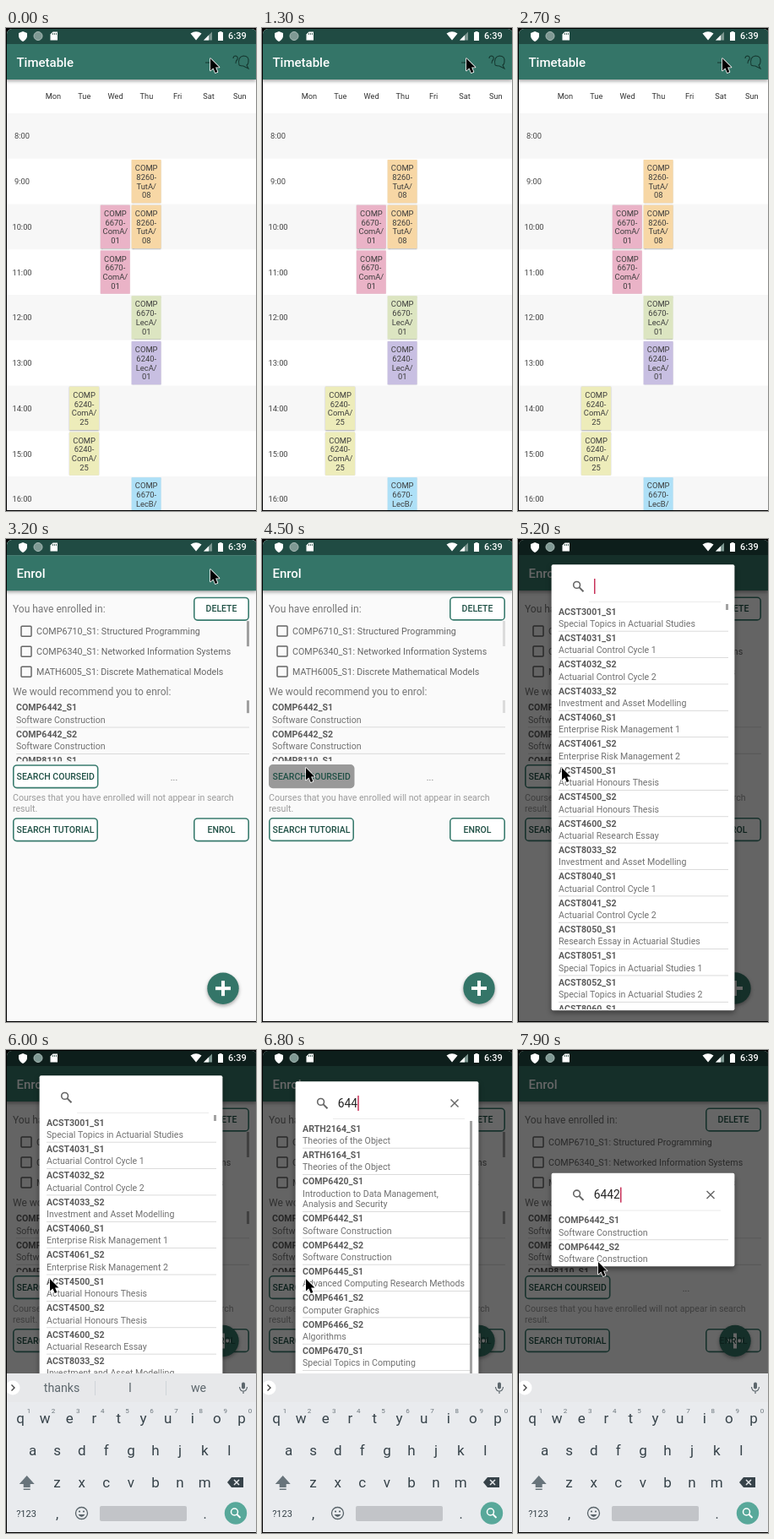
These frames come from a looping animation (296 by 572 pixels, 8000 ms). An HTML page with a canvas:

```html
<!DOCTYPE html>
<html lang="en">
<head>
<meta charset="utf-8">
<title>Timetable</title>
<style>
html, body { margin: 0; width: 100%; height: 100%; overflow: hidden; background: #000; }
canvas { display: block; width: 296px; height: 572px; }
</style>
</head>
<body>
<canvas id="stage"></canvas>
<script>
const W = 296, H = 572, LOOP = 8000, TICK = 100;
const BAR = '#347568', STATUS = '#204b43', INK = '#1f5045';
const canvas = document.getElementById('stage');
const c = canvas.getContext('2d');
const dpr = window.devicePixelRatio || 1;
canvas.width = W * dpr;
canvas.height = H * dpr;

const ramp = (t, a, b) => Math.min(1, Math.max(0, (t - a) / (b - a)));
const ease = k => k * k * (3 - 2 * k);
const easeOut = k => 1 - (1 - k) ** 4;
const mix = (a, b, k) => a + (b - a) * k;

// y is the middle of the capital letters
function text(s, x, y, size, color, weight = 400, align = 'left') {
  c.font = `${weight} ${size}px Roboto, sans-serif`;
  c.textAlign = align;
  c.fillStyle = color;
  c.fillText(s, x, y + size * 0.355);
}
function rect(x, y, w, h, color) {
  c.fillStyle = color;
  c.fillRect(x, y, w, h);
}
function round(x, y, w, h, r) {
  c.beginPath();
  c.roundRect(x, y, w, h, r);
}
function disc(x, y, r, color) {
  c.fillStyle = color;
  c.beginPath();
  c.arc(x, y, r, 0, 7);
  c.fill();
}
function ring(x, y, r, color, width) {
  c.beginPath();
  c.arc(x, y, r, 0, 7);
  c.strokeStyle = color;
  c.lineWidth = width;
  c.stroke();
}
function poly(points, color) {
  c.beginPath();
  points.forEach(([x, y]) => c.lineTo(x, y));
  c.closePath();
  c.fillStyle = color;
  c.fill();
}
function line(points, color, width) {
  c.beginPath();
  points.forEach(([x, y]) => c.lineTo(x, y));
  c.strokeStyle = color;
  c.lineWidth = width;
  c.stroke();
}
function path(d, color, width) {
  const p = new Path2D(d);
  if (width) {
    c.strokeStyle = color;
    c.lineWidth = width;
    c.stroke(p);
  } else {
    c.fillStyle = color;
    c.fill(p);
  }
}
function group(draw) {
  c.save();
  draw();
  c.restore();
}
function clipTo(x, y, w, h) {
  c.beginPath();
  c.rect(x, y, w, h);
  c.clip();
}
function shadow(color, blur, dy) {
  c.shadowColor = color;
  c.shadowBlur = blur * dpr;
  c.shadowOffsetY = dy * dpr;
}

// ---- status bar and toolbar ----
function statusIcons() {
  path('M20 4 L25 6 V10 Q24 14 20 16 Q16 14 15 10 V6 Z', '#fff');
  disc(38, 9.5, 5, '#7f9994');
  ring(38, 9.5, 5, '#a9bbb7', 1);
  path('M55.5 4.5 H61 V14.5 H52.5 V7.5 Z', '#fff');
  [55, 57, 59].forEach(x => rect(x, 6, 1, 2, '#49675f'));
  path('M218.5 6.5 Q225 2 231.5 6.5 L225 14.5 Z', '#fff');
  poly([[234, 14.5], [244, 14.5], [244, 4.5]], '#7b958f');
  poly([[234, 14.5], [240, 14.5], [240, 8.5]], '#fff');
  rect(251, 5, 6, 10, '#fff');
  rect(252.5, 4, 3, 1, '#fff');
  text('6:39', 263, 9.5, 11, '#fff', 500);
}
function toolbar(title) {
  group(() => {
    shadow('rgba(0,0,0,.35)', 4, 1.5);
    rect(0, 19, W, 42, BAR);
  });
  rect(0, 0, W, 19, STATUS);
  text(title, 12.5, 40.5, 15, '#fff', 500);
}

// ---- timetable ----
const ROW = 53.75, COL = 36.8, TOP = 101;
const DAYS = ['Mon', 'Tue', 'Wed', 'Thu', 'Fri', 'Sat', 'Sun'];
const CELLS = [
  [3, 9, '8260-', 'TutA/', '08', '#f7d7a5'],
  [3, 10, '8260-', 'TutA/', '08', '#f7d7a5'],
  [2, 10, '6670-', 'ComA/', '01', '#eab3c7'],
  [2, 11, '6670-', 'ComA/', '01', '#eab3c7'],
  [3, 12, '6670-', 'LecA/', '01', '#dce5c1'],
  [3, 13, '6240-', 'LecA/', '01', '#c8bfe2'],
  [1, 14, '6240-', 'ComA/', '25', '#edecba'],
  [1, 15, '6240-', 'ComA/', '25', '#edecba'],
  [3, 16, '6670-', 'LecB/', '01', '#aee0f7']
];
function timetable() {
  rect(0, 0, W, H, '#fff');
  for (let h = 8; h <= 16; h++) {
    const y = TOP + (h - 8) * ROW;
    if (h % 2 === 0) rect(0, y, W, ROW, '#f7f7f7');
    text(h + ':00', 19, y + 27, 9.3, '#444', 400, 'center');
  }
  for (const [day, hour, ...rest] of CELLS) {
    const color = rest.pop(), x = 75 + (day - 1) * COL, y = TOP + (hour - 8) * ROW + 1.2;
    group(() => {
      shadow('rgba(0,0,0,.3)', 1.5, 0.7);
      rect(x, y, 35, 51.3, color);
    });
    ['COMP', ...rest].forEach((s, i) =>
      text(s, x + 17.6, y + 9.8 + i * 10.8, 9.4, '#3c3c3c', 400, 'center'));
  }
  DAYS.forEach((d, i) => text(d, 56 + i * COL, 81, 9.2, '#333', 400, 'center'));
  toolbar('Timetable');
  line([[236, 41], [248, 41]], '#15372f', 1.2);
  line([[242, 35], [242, 47]], '#15372f', 1.2);
  path('M276 44 Q274 34 281 33 Q288 33 287 40 Q287 43 285 44 L287 48 L281 45 Q278 45 276 44', '#15372f', 1.1);
  path('M269 36 Q269 33 272 33 Q275 34 274 37 Q272 39 272 42', '#15372f', 1.1);
  statusIcons();
}

// ---- enrol page ----
const SOFT = 'Software Construction';
function button(s, x, y, w, pressed) {
  round(x + 0.8, y + 0.8, w - 1.6, 26.6, 4);
  c.fillStyle = pressed ? '#999' : '#fff';
  c.fill();
  c.strokeStyle = pressed ? '#999' : '#3a7c6f';
  c.lineWidth = 1.6;
  c.stroke();
  text(s, x + w / 2, y + 14, 10.5, INK, 500, 'center');
}
// Entries read "code|line|line"; y is the middle of the first code
function courseList(items, x, right, y) {
  for (const item of items) {
    const [code, ...lines] = item.split('|');
    text(code, x, y, 10.6, '#5c5c5c', 700);
    lines.forEach((s, i) => text(s, x, y + 14.4 + i * 12.5, 10.6, '#707070'));
    y += 31.37 + (lines.length - 1) * 12.5;
    rect(x, y - 8.4, right - x, 0.8, '#d2d2d2');
  }
}
function enrol(pressed, bars, fabY) {
  rect(0, 0, W, H, '#fafafa');
  text('You have enrolled in:', 8, 82.5, 12, '#757575');
  button('DELETE', 222, 68.5, 66);
  ['COMP6710_S1: Structured Programming',
   'COMP6340_S1: Networked Information Systems',
   'MATH6005_S1: Discrete Mathematical Models'].forEach((s, i) => {
    const y = 109 + i * 24;
    round(18, y - 6, 12, 12, 1);
    c.strokeStyle = '#666';
    c.lineWidth = 1.5;
    c.stroke();
    text(s, 36, y, 10.7, '#666');
  });
  text('We would recommend you to enrol:', 8, 180.5, 12, '#757575');
  group(() => {
    clipTo(0, 190, W, 73);
    courseList(['COMP6442_S1|' + SOFT, 'COMP6442_S2|' + SOFT, 'COMP8110_S1|'], 12, 288, 199.5);
  });
  group(() => {
    c.globalAlpha *= bars;
    rect(285, 97, 3, 30, '#a0a0a0');
    rect(285, 191, 3, 15, '#a0a0a0');
  });
  button('SEARCH COURSEID', 8, 267, 101.5, pressed);
  text('...', 199, 282, 10.6, '#777', 400, 'center');
  text('Courses that you have enrolled will not appear in search', 8, 306.5, 10.6, '#9a9a9a');
  text('result.', 8, 319, 10.6, '#9a9a9a');
  button('SEARCH TUTORIAL', 8, 330, 101, false);
  button('ENROL', 222, 330, 66, false);
  group(() => {
    shadow('rgba(0,0,0,.35)', 4, 2);
    disc(257, fabY, 18.7, BAR);
  });
  rect(248, fabY - 2, 18, 4, '#fff');
  rect(255, fabY - 9, 4, 18, '#fff');
  if (fabY < 400) text('ENROL', 255, 344, 10.5, INK, 500, 'center');
  toolbar('Enrol');
}

// ---- search dialog ----
const ALL = [
  'ACST3001_S1|Special Topics in Actuarial Studies',
  'ACST4031_S1|Actuarial Control Cycle 1',
  'ACST4032_S2|Actuarial Control Cycle 2',
  'ACST4033_S2|Investment and Asset Modelling',
  'ACST4060_S1|Enterprise Risk Management 1',
  'ACST4061_S2|Enterprise Risk Management 2',
  'ACST4500_S1|Actuarial Honours Thesis',
  'ACST4500_S2|Actuarial Honours Thesis',
  'ACST4600_S2|Actuarial Research Essay',
  'ACST8033_S2|Investment and Asset Modelling',
  'ACST8040_S1|Actuarial Control Cycle 1',
  'ACST8041_S2|Actuarial Control Cycle 2',
  'ACST8050_S1|Research Essay in Actuarial Studies',
  'ACST8051_S1|Special Topics in Actuarial Studies 1',
  'ACST8052_S1|Special Topics in Actuarial Studies 2',
  'ACST8060_S1|'
];
const FOUND = [
  'ARTH2164_S1|Theories of the Object',
  'ARTH6164_S1|Theories of the Object',
  'COMP6420_S1|Introduction to Data Management,|Analysis and Security',
  'COMP6442_S1|' + SOFT,
  'COMP6442_S2|' + SOFT,
  'COMP6445_S1|Advanced Computing Research Methods',
  'COMP6461_S2|Computer Graphics',
  'COMP6466_S2|Algorithms',
  'COMP6470_S1|Special Topics in Computing'
];
const QUERY = '6442', KEY_TIMES = [6300, 6500, 6700, 6900], LAG = 150;
const keysBy = t => KEY_TIMES.filter(k => k <= t).length;

// The list follows the query a moment later
function results(t) {
  const n = keysBy(t - LAG);
  if (n < 2) return { items: ALL, top: 30.5, bottom: 558 };
  if (n < 3) return { items: FOUND, top: 37.5, bottom: 558 };
  const items = FOUND.slice(3, n < 4 ? 6 : 5);
  const half = (47 + 31.4 * items.length) / 2;
  return { items, top: 201 - half, bottom: 201 + half };
}
function dialog(t) {
  const { items, top, bottom } = results(t), h = bottom - top, mid = top + 25.5;
  group(() => {
    shadow('rgba(0,0,0,.4)', 6, 3);
    round(39.6, top - 0.3, 216.8, h + 0.6, 2);
    c.fillStyle = '#fff';
    c.fill();
  });
  ring(69.6, mid - 1.6, 3.9, '#666', 1.6);
  line([[72.6, mid + 1.4], [77.5, mid + 6.3]], '#666', 2);
  rect(84, top + 43.6, 156, 0.7, '#e2e2e2');
  const n = keysBy(t), s = QUERY.slice(0, n);
  text(s, 89.8, mid, 13.8, '#222');
  const caretX = 90 + c.measureText(s).width;
  if (n) {
    line([[223.5, mid - 4.5], [232.5, mid + 4.5]], '#666', 1.4);
    line([[232.5, mid - 4.5], [223.5, mid + 4.5]], '#666', 1.4);
  }
  const since = t - (n ? KEY_TIMES[n - 1] : 5100);
  if (Math.floor(since / 500) % 2 === 0) rect(caretX, mid - 9, 1.5, 18, '#c8325a');
  group(() => {
    clipTo(40, top + 45, 216, h - 46);
    courseList(items, 48, 249, top + 55.3);
    if (items === ALL) rect(246, 77, 3, 7, '#a2a2a2');
    if (items === FOUND) rect(246, 84, 3, 400, '#a2a2a2');
  });
}

// ---- keyboard ----
const KEY = '#37434a', BOARD = '#e9ebee';
function keyboard(y, suggest) {
  group(() => {
    c.translate(0, y - 383);
    rect(0, 383, W, 190, BOARD);
    rect(0, 383, W, 34, '#e7e8ea');
    disc(8, 400, 8.5, '#fff');
    line([[6.5, 396.5], [10, 400], [6.5, 403.5]], '#444', 1.4);
    if (suggest) {
      [['thanks', 66], ['I', 147], ['we', 228]].forEach(([s, x]) =>
        text(s, x, 400, 14.2, '#5d676d', 400, 'center'));
      [105, 189].forEach(x => rect(x, 392, 1, 17, '#cfd4d8'));
    }
    round(279, 393.5, 4, 8, 2);
    c.fillStyle = '#5d676d';
    c.fill();
    path('M276.5 399 Q277 404 281 404 Q285 404 285.5 399 M281 404 V407', '#5d676d', 1.2);

    [['qwertyuiop', 17, 436], ['asdfghjkl', 31.5, 473.5], ['zxcvbnm', 60.5, 511.5]].forEach(([keys, x0, ky], row) =>
      [...keys].forEach((k, i) => {
        const x = x0 + i * 29.1;
        text(k, x, ky, 17, KEY, 400, 'center');
        if (row === 0) text((i + 1) % 10, x + 10, 427.5, 8, '#6c767c', 400, 'center');
      }));
    poly([[24.7, 504], [33.7, 514], [28.7, 514], [28.7, 518], [20.7, 518], [20.7, 514], [15.7, 514]], '#68747b');
    rect(20.7, 519.5, 8, 1.5, '#68747b');
    poly([[262, 512], [267, 506], [281, 506], [281, 518], [267, 518]], KEY);
    line([[270, 509], [276, 515]], BOARD, 1.4);
    line([[276, 509], [270, 515]], BOARD, 1.4);

    text('?123', 24, 549, 11, KEY, 400, 'center');
    text(',', 60.5, 549, 16, KEY, 400, 'center');
    text('.', 235.5, 549, 16, KEY, 400, 'center');
    ring(89.5, 548.5, 7, '#59646a', 1.3);
    disc(87, 546.5, 1.1, '#59646a');
    disc(92, 546.5, 1.1, '#59646a');
    path('M85.5 550 Q89.5 556 93.5 550 Z', '#59646a');
    round(111, 540, 103, 18, 2);
    c.fillStyle = '#c2c4c8';
    c.fill();
    disc(272, 548.5, 13.2, '#58a89a');
    ring(270.5, 547, 4, '#fff', 1.5);
    line([[273.5, 550], [277.5, 554]], '#fff', 1.8);
  });
}

// ---- pointer ----
// [start, end, x, y]: the pointer reaches x, y at the end time
const MOVES = [
  [3400, 4100, 52, 271],
  [7300, 7900, 95, 251]
];
function pointer(t) {
  let x = 242, y = 36;
  for (const [a, b, tx, ty] of MOVES) {
    const k = ease(ramp(t, a, b));
    x = mix(x, tx, k);
    y = mix(y, ty, k);
  }
  group(() => {
    c.translate(x, y);
    const p = new Path2D('M0 0 V14.5 L3.4 11.5 L5.8 17 L8.4 15.9 L6.1 10.5 H10.5 Z');
    c.lineJoin = 'round';
    c.strokeStyle = '#fff';
    c.lineWidth = 1.6;
    c.stroke(p);
    c.fillStyle = '#000';
    c.fill(p);
  });
}

function draw(t) {
  c.setTransform(dpr, 0, 0, dpr, 0, 0);
  rect(0, 0, W, H, '#000');
  group(() => {
    round(1, 1, 296, 570, [6, 6, 0, 0]);
    c.clip();
    const enter = ramp(t, 2900, 3100);
    if (enter < 1 || t < 3300) timetable();
    if (enter > 0) {
      const resized = t >= 5900;
      const bars = 1 - (resized ? ramp(t, 7100, 7400) : ramp(t, 4300, 4600));
      group(() => {
        c.globalAlpha = enter;
        c.translate(0, 46 * (1 - easeOut(ramp(t, 2900, 3300))));
        enrol(t >= 4400 && t < 4700, bars, resized ? 344.5 : 532);
      });
    }
    const open = ramp(t, 4700, 4950);
    if (open > 0) {
      rect(0, 0, W, H, `rgba(0,0,0,${0.6 * open})`);
      group(() => {
        const zoom = mix(0.9, 1, easeOut(open));
        c.globalAlpha = open;
        c.translate(148, 294);
        c.scale(zoom, zoom);
        c.translate(-148, -294);
        dialog(t);
      });
    }
    if (enter > 0) statusIcons();
    if (t >= 5700) keyboard(mix(571, 383, easeOut(ramp(t, 5600, 5900))), keysBy(t) === 0);
    pointer(t);
  });
}

function frame(now) {
  draw(Math.floor((now % LOOP) / TICK) * TICK);
  requestAnimationFrame(frame);
}
requestAnimationFrame(frame);
</script>
</body>
</html>
```
